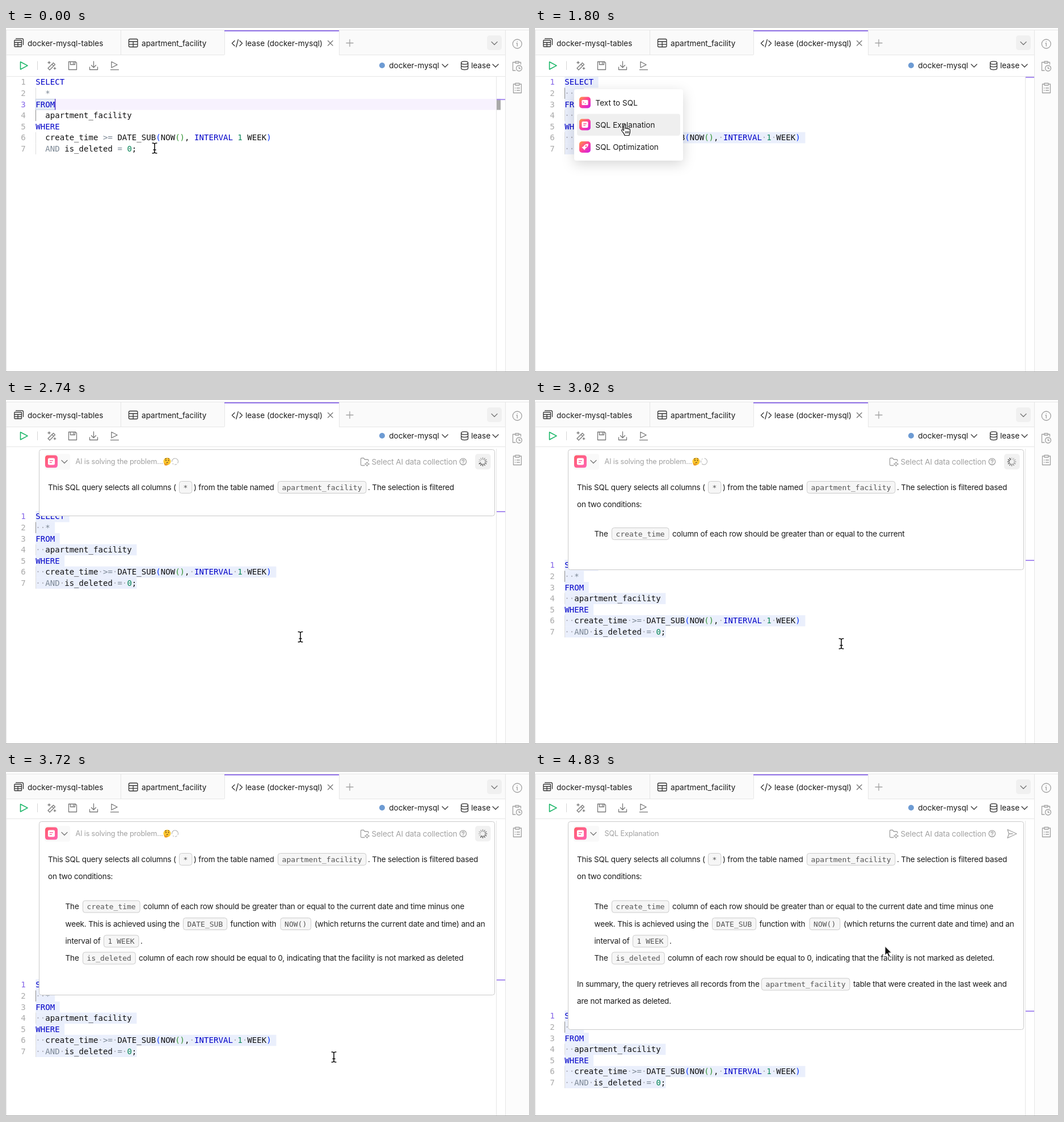
Animation of 922x607 px, one loop 4860 ms. Source, as an HTML page:

```html
<!DOCTYPE html>
<html lang="en">
<head>
<meta charset="utf-8">
<title>SQL editor</title>
<style>
  html, body { margin: 0; width: 100%; height: 100%; overflow: hidden; background: #fff; }
  svg { display: block; width: 922px; height: 607px; cursor: default; user-select: none; }
  text { font: 13.6px Inter, sans-serif; fill: #1c1c1c; white-space: pre; }
  .body { letter-spacing: -.21px; }
  .hint { font-size: 12.8px; letter-spacing: -.2px; fill: #a2a2a2; }
  .pale { letter-spacing: -.16px; fill: #a2a2a2; }
  .code { font: 14.09px "DejaVu Sans Mono", monospace; fill: #111; }
  .chip text { font: 13px "DejaVu Sans Mono", monospace; fill: #555; }
  .chip rect { fill: #f6f6f6; stroke: #cbcbcb; }
  .num { fill: #a9a9a9; }
  .num.on { fill: #8465e8; }
  .kw { fill: #0000c8; }
  .op { fill: #7b8794; }
  .lit { fill: #098658; }
  .p1 { fill: #0431fa; }
  .p2 { fill: #319331; }
  .dots { fill: #a9a9b4; }
  .i { fill: none; stroke: #333; stroke-width: 1.3; stroke-linecap: round; stroke-linejoin: round; }
  .g { stroke: #777; }
  .l { stroke: #a0a0a0; }
  .run { stroke: #18b566; stroke-width: 1.6; }
  .w { fill: #fff; }
  .line { fill: none; stroke: #e6e6e6; }
  #menu > rect:first-child { filter: drop-shadow(0 6px 11px rgba(0,0,0,.16)); }
</style>
</head>
<body>
<svg viewBox="0 0 922 607">
  <defs>
    <linearGradient id="hot" x1="0" y1="0" x2="1" y2="1">
      <stop offset="0" stop-color="#ff9a3d"/><stop offset=".5" stop-color="#ff3f9a"/><stop offset="1" stop-color="#c91fe8"/>
    </linearGradient>
    <linearGradient id="pink" x1="0" y1="0" x2="1" y2="1">
      <stop offset="0" stop-color="#ff5b68"/><stop offset="1" stop-color="#ff64b4"/>
    </linearGradient>
    <path id="down" d="M-5-2.5 0 2.5 5-2.5"/>
    <g id="note"><rect class="w" x="-5.5" y="-5.5" width="11" height="11" rx="2.2"/><path d="M-2.8-1.5H2.8M-2.8 1.7H1" stroke="#ff4f90" stroke-width="1.3"/></g>
    <path id="ibeam" d="M-3.8-9Q0-9 0-7 0-9 3.8-9M0-7V7M-3.8 9Q0 9 0 7 0 9 3.8 9M-2 3H2"/>
  </defs>
  <rect width="922" height="607" fill="#fff"/>

  <!-- editor -->
  <path class="line" d="M864.5 86V606"/>
  <g id="code"></g>

  <!-- tabs -->
  <rect y="4" width="880" height="43" fill="#fafafa"/>
  <rect x="881" y="4" width="41" height="602" fill="#fcfcfc"/>
  <rect x="385" y="4" width="202" height="44" fill="#fff"/>
  <path class="line" d="M0 3.5H922M.5 4V606M202.5 4V47M385.5 4V47M587.5 4V47M0 47.5H385M587 47.5H880M880.5 4V606"/>
  <path d="M385 5H587" stroke="#9273ea" stroke-width="2"/>
  <path d="M0 606.5H922" stroke="#a5a5a5"/>
  <path class="i" d="M17.5 18.7H28q2.500 0 2.500 2.500V29.500M15.800 21.500H26.500q1 0 1 1V32q0 1-1 1H15.800q-1 0-1-1V22.500q0-1 1-1ZM14.800 25.500H27.500M14.800 29.300H27.500M21 25.500V33"/>
  <text x="38" y="31.600">docker-mysql-tables</text>
  <path class="i" d="M218.500 19.500H230q2 0 2 2V31.500q0 2-2 2H218.500q-2 0-2-2V21.500q0-2 2-2ZM216.500 24H232M216.500 28.800H232M224.200 24V33.500"/>
  <text x="239" y="31.600">apartment_facility</text>
  <path class="i" d="M403 22.500 398.500 27 403 31.500M412 22.500 416.500 27 412 31.500M409.300 20.500 405.800 33.500"/>
  <text x="422" y="31.600">lease (docker-mysql)</text>
  <path class="i g" d="M567.500 22.500 576 31M576 22.500 567.500 31"/>
  <path class="i l" d="M600 26.500H612M606 20.500V32.500"/>
  <rect x="848" y="13" width="26" height="26" rx="5" fill="#f0f0f0"/>
  <use href="#down" class="i g" x="861" y="27"/>

  <!-- side bar -->
  <g class="i l">
    <circle cx="901.300" cy="28" r="8"/><path d="M901.300 27V32M900 27H901.300M901.300 24V24.200"/>
    <path d="M898 60.500H893.500V75H898M904 60.500H907.500V64M898 59H904V62H898Z"/><circle cx="904.500" cy="71" r="5"/><path d="M904.500 68.500V71.500H906.500"/>
    <path d="M898 99H894.500V114.500H908.500V99H905M898 97.500H905V101H898ZM897.500 106H898M900.500 106H905.500M897.500 110H898M900.500 110H905.500"/>
  </g>

  <!-- toolbar -->
  <g id="bar">
    <path class="line" d="M1 85.500H880"/>
    <path class="i run" d="M25.500 59.800V73L38 66.400Z"/>
    <path d="M55.500 58.500V74" stroke="#d5d5d5"/>
    <g class="i g">
      <path d="M74 71 83.500 61.500 86.500 64.500 77 74ZM81 64 84 67M76 59V63M74 61H78M86 69.500V73M84.300 71.300H87.800"/>
      <path d="M110.500 59.500H122.500L124.500 61.500V73.500H110.500ZM113.500 59.500V64.500H121.500V59.500M118.800 61V63"/>
      <path d="M154.500 59V69.500M150.500 65.800 154.500 69.800 158.500 65.800M147.500 69V73.500H161.500V69"/>
      <path d="M186 59.500V70L196 64.800ZM184.500 73.700H198.500"/>
    </g>
    <circle cx="663" cy="66" r="5" fill="#6d9bd3"/>
    <text x="675.300" y="71.300">docker-mysql</text>
    <use href="#down" class="i" x="774" y="66.500"/>
    <g class="i"><ellipse cx="808.500" cy="61.500" rx="6" ry="2.600"/><path d="M802.500 61.500V71c0 3.500 12 3.500 12 0V61.500M802.500 66c0 3.500 12 3.500 12 0"/></g>
    <text x="820" y="71.300">lease</text>
    <use href="#down" class="i" x="863" y="66.500"/>
  </g>

  <!-- answer panel -->
  <g id="panel">
    <rect id="box" x="58.500" y="87.500" width="803" rx="4" fill="#fff" stroke="#c9c9c9"/>
    <rect x="68" y="95" width="45" height="28" rx="4" fill="#f9f9f9"/>
    <rect x="69" y="97.500" width="22" height="22" rx="4.500" fill="url(#pink)"/>
    <use href="#note" transform="translate(80 108.500) scale(1.100)"/>
    <use href="#down" class="i g" x="103" y="109"/>
    <text id="title" class="hint" x="122.500" y="113.300"></text>
    <g class="i l"><path d="M632 115.500H627q-1.500 0-1.500-1.500V104q0-1.500 1.500-1.500H630.500L632.500 105H637.500q1.500 0 1.500 1.500V108M636.500 109.500 638 112 640.500 113 638 114 636.500 116.500 635 114 632.500 113 635 112Z"/><circle cx="805.800" cy="108.800" r="5.700"/><path d="M804 107.500c0-2.800 3.700-2.500 3.700-.3 0 1.500-1.900 1.300-1.900 3M805.800 112V112.200"/></g>
    <text class="pale" x="644.500" y="113.700">Select AI data collection</text>
    <g id="busy">
      <circle cx="284" cy="108.300" r="6.500" fill="#fcc72f"/>
      <circle cx="282" cy="106.500" r="1" fill="#664018"/><circle cx="286.500" cy="106.500" r="1" fill="#664018"/>
      <path d="M280 104 283 103.300M285.500 103 288 103.800M282.500 110.800 286 110" stroke="#664018" fill="none"/>
      <path d="M278 111 282 112.500H286L284 115.500H280Z" fill="#ec9a1c"/>
      <circle id="ring" cx="298" cy="108.500" r="5.500" fill="none" stroke="#b0b0b0" stroke-dasharray="12 2 4 2 2 3"/>
      <rect x="827" y="95" width="27.500" height="27.500" rx="5" fill="#f1f1f1"/>
      <g id="spin"></g>
    </g>
    <path id="send" class="i l" d="M833 101.500 849 109 833 116.500 835.500 109ZM835.500 109H842"/>
    <g id="answer"></g>
  </g>

  <!-- context menu -->
  <g id="menu">
    <rect x="69" y="108" width="192" height="126" rx="4" fill="#fff"/>
    <rect id="hover" x="74" width="182" height="38.500" rx="4" fill="#efefef"/>
    <g fill="url(#hot)"><rect x="78" y="121.500" width="20" height="20" rx="5"/><rect x="78" y="160.500" width="20" height="20" rx="5"/><rect x="78" y="200" width="20" height="20" rx="5"/></g>
    <rect class="w" x="82.500" y="127" width="11" height="9" rx="1.500"/><path d="M84.500 129.500 86.500 131 84.500 132.500M87.500 133.500H90" fill="none" stroke="#ff4f90"/>
    <use href="#note" x="88" y="170.500"/>
    <path class="w" d="M94 204.500Q88 204 85.500 209L82.500 210.500 87.500 215.500 89 212.500Q94 210 94 204.500Z"/><circle cx="90" cy="208.500" r="1.400" fill="#ff4f90"/>
    <text x="106.500" y="136.700">Text to SQL</text>
    <text x="106.500" y="175.700">SQL Explanation</text>
    <text x="106.500" y="214.900">SQL Optimization</text>
  </g>

  <!-- pointers -->
  <g id="beam" fill="none" stroke-linecap="round">
    <use href="#ibeam" stroke="#fff" stroke-width="3.200" opacity=".8"/>
    <use href="#ibeam" stroke="#111" stroke-width="1.600"/>
  </g>
  <path id="hand" d="M-4.500 1V-8c0-2 2.800-2 2.800 0V-2.500c.5-1.500 2.800-1.200 2.900.4.600-1.300 2.700-1 2.800.6.700-1 2.500-.6 2.500 1V4c0 2-1.500 3-1.500 5.500H-3C-3 7-6 4.500-8 1.500-9-.5-6.500-1.500-4.500 1ZM-1 2V6M1.500 2V6M4 2V6" fill="#fff" stroke="#111" stroke-width="1.200" stroke-linejoin="round"/>
  <path id="arrow" d="M0 0V16L3.700 12.500 6.500 19 9.200 17.800 6.400 11.500H11.500Z" fill="#111" stroke="#fff"/>
</svg>
<script>
const LOOP = 4860, X0 = 52.3, TOP = 85.8, ROW = 19.58, CW = 8.483;
const CLICK = 240, MENU = 1000, OPEN = 1980, DONE = 4070;

const $ = id => document.getElementById(id);
const set = (node, attrs) => { for (const k in attrs) node.setAttribute(k, attrs[k]); return node; };
const add = (parent, tag, attrs = {}, text = '') => {
  const node = set(document.createElementNS('http://www.w3.org/2000/svg', tag), attrs);
  node.textContent = text;
  return parent.appendChild(node);
};
const show = (node, on) => { node.style.display = on ? '' : 'none'; };
const clamp = (v, lo, hi) => Math.max(lo, Math.min(hi, v));

// value between timed points [t, a, b...]
function track(keys, t, ease = k => k) {
  if (t <= keys[0][0]) return keys[0].slice(1);
  for (let i = 1; i < keys.length; i++) {
    const a = keys[i - 1], b = keys[i];
    if (t <= b[0]) {
      const k = ease((t - a[0]) / (b[0] - a[0]));
      return a.slice(1).map((v, j) => v + (b[j + 1] - v) * k);
    }
  }
  return keys[keys.length - 1].slice(1);
}

// ---- code ----
const sql = ['SELECT', '  *', 'FROM', '  apartment_facility', 'WHERE',
  '  create_time >= DATE_SUB(NOW(), INTERVAL 1 WEEK)', '  AND is_deleted = 0;'];
const LAST = sql.length - 1;
const rowTop = i => TOP + i * ROW;
const code = $('code');
const active = add(code, 'rect', { x: X0, width: 812, height: ROW, fill: '#f7f2fe' });
const word = add(code, 'rect', { x: X0, y: rowTop(2) + .5, width: 4 * CW, height: ROW - 1, fill: '#e6edf7', stroke: '#c3cfe2' });
const block = add(code, 'rect', { x: 865, y: rowTop(2), width: 7, height: ROW, fill: '#a9a9a9' });
const mark = add(code, 'rect', { x: 865, width: 15, height: 2, fill: '#a78bf0' });

function paintTokens(parent, line) {
  let depth = 0;
  for (const tok of line.match(/\w+|[()]|[^\w()]+/g)) {
    let cls = '';
    if (/^(SELECT|FROM|WHERE|INTERVAL)$/.test(tok)) cls = 'kw';
    else if (/^(AND|\W*[*>=]+ ?)$/.test(tok)) cls = 'op';
    else if (/^\d+$/.test(tok)) cls = 'lit';
    else if (tok === '(') cls = 'p' + ++depth;
    else if (tok === ')') cls = 'p' + depth--;
    add(parent, 'tspan', { class: cls }, tok);
  }
}

const rows = sql.map((line, i) => {
  const y = rowTop(i), base = y + 14.6;
  const sel = add(code, 'rect', { y, height: ROW + .1 });
  const guide = /^ /.test(line) && add(code, 'path', { d: `M52.5 ${y}v${ROW}` });
  const dots = add(code, 'text', { class: 'code dots', x: X0, y: base });
  const num = add(code, 'text', { class: 'code num', x: 26.3, y: base }, i + 1);
  paintTokens(add(code, 'text', { class: 'code', x: X0, y: base }), line);
  return { line, sel, guide, dots, num };
});
const caret = add(code, 'rect', { width: 1.6, height: ROW, fill: '#6a4fd0' });

function paintCode(t, x, y, shift) {
  let row = 2, col = 4;
  if (t >= CLICK) {
    const at = t < 700 ? Math.floor((y - TOP) / ROW) : -1;
    row = clamp(at, 0, LAST);
    col = at < 0 ? 0 : clamp(Math.round((x - X0) / CW), 0, sql[row].length);
  }
  const picked = t >= CLICK && !(row === LAST && col === sql[LAST].length);
  const tint = t < MENU ? '#e0d2fc' : '#eaeffc';
  set(code, { transform: `translate(0 ${shift})` });
  show(active, !picked);
  set(active, { y: rowTop(row) });
  set(mark, { y: rowTop(row) + .2 });
  show(word, t < CLICK);
  show(block, t < CLICK);
  show(caret, t < MENU);
  set(caret, { x: X0 + col * CW - .3, y: rowTop(row) });
  rows.forEach((r, i) => {
    const on = picked && i >= row, from = i === row ? col : 0;
    show(r.sel, on);
    set(r.sel, { x: X0 + from * CW, width: (r.line.length - from + (i < LAST)) * CW, fill: tint });
    r.dots.textContent = on ? r.line.replace(/./g, (c, j) => c === ' ' && j >= from ? '·' : ' ') : '';
    r.num.classList.toggle('on', i === row);
    if (r.guide) set(r.guide, { stroke: i === (t < CLICK ? 3 : 1) ? '#8c8c8c' : '#dcdcdc' });
  });
}

// ---- answer: [y, [x, text]...]; a chip starts with ` ----
const reply = [
  [154, [74, 'This SQL query selects all columns ('], [305, '`*'], [331, ') from the table named'],
    [479, '`apartment_facility'], [638, '. The selection is filtered based']],
  [184, [74, 'on two conditions:']],
  [237.5, [104.5, 'The'], [135, '`create_time'],
    [242, 'column of each row should be greater than or equal to the current date and time minus one']],
  [268, [104.5, 'week. This is achieved using the'], [312, '`DATE_SUB'], [395.5, 'function with'],
    [483.5, '`NOW()'], [544, '(which returns the current date and time) and an']],
  [298.5, [104.5, 'interval of'], [172, '`1 WEEK'], [237, '.']],
  [328.5, [104.5, 'The'], [135, '`is_deleted'],
    [234, 'column of each row should be equal to 0, indicating that the facility is not marked as deleted.']],
  [374.5, [74, 'In summary, the query retrieves all records from the'], [399, '`apartment_facility'],
    [561, 'table that were created in the last week and']],
  [404.5, [74, 'are not marked as deleted.']]
];
// a list of one item is set tighter
const tightY = { 2: 236, 3: 263, 4: 290 };
let total = 0;
const lines = reply.map(([y, ...parts]) => {
  const g = add($('answer'), 'g'), start = total;
  const runs = parts.map(([x, raw]) => {
    const chip = raw[0] === '`', text = chip ? raw.slice(1) : raw, at = total;
    total += text.length;
    if (!chip) return { text, at, node: add(g, 'text', { class: 'body', x, y: 4.6 }) };
    const node = add(g, 'g', { class: 'chip' });
    add(node, 'rect', { x: x + .5, y: -10.5, width: text.length * 7.826 + 14.5, height: 21, rx: 4 });
    add(node, 'text', { x: x + 7.6, y: 4.6 }, text);
    return { text, at, node, chip };
  });
  return { y, g, start, runs };
});
const typed = [[2450, 0], [2738, 104], [3358, 330], [3716, 462], [3742, 462], [4060, total]];

function cut(text, n) {
  let out = '';
  for (const tok of text.match(/\s*(\w+|[^\w\s])/g)) {
    if (out.length + tok.length > n) break;
    out += tok;
  }
  return out;
}

// fills the panel and returns its bottom edge
function paintAnswer(t) {
  const n = Math.floor(track(typed, t)[0] + .01);
  const loose = n > lines[5].start;
  let bottom = 131;
  lines.forEach((l, i) => {
    const on = n > l.start, y = loose ? l.y : tightY[i] || l.y;
    show(l.g, on);
    if (!on) return;
    set(l.g, { transform: `translate(0 ${y})` });
    for (const r of l.runs) {
      if (r.chip) show(r.node, n >= r.at + r.text.length);
      else r.node.textContent = cut(r.text, n - r.at);
    }
    bottom = y + (i < 2 || i > 5 ? 50 : loose ? 64.5 : 63);
  });
  return Math.floor(bottom);
}

for (let i = 0; i < 12; i++)
  add($('spin'), 'path', { d: 'M0-3.8V-7.8', stroke: '#333', 'stroke-width': 1.4, opacity: .2 + i / 14, transform: `rotate(${i * 30})` });

// ---- pointer ----
const path = [[240, 262, 212], [700, 56, 74], [820, 56, 72], [895, 69, 108], [1100, 69, 108],
  [1760, 161, 180], [1960, 161, 180], [2460, 470, 331], [2735, 519, 418], [3000, 540, 430],
  [3400, 540, 430], [3720, 578, 503], [3740, 578, 503], [4080, 469, 518], [4260, 603, 349],
  [4750, 603, 349], [4830, 617, 307.5]];
const smooth = k => k * k * (3 - 2 * k);

function paint(t) {
  const [x, y] = track(path, t, smooth);
  const open = t >= OPEN, menu = t >= MENU && !open, busy = t < DONE;
  let shift = 0;
  if (open) {
    const h = paintAnswer(t) - 87;
    shift = Math.round(h * .9 + 5);
    set($('box'), { height: h });
    $('title').textContent = busy ? 'AI is solving the problem...' : 'SQL Explanation';
    set($('spin'), { transform: `translate(840.5 109) rotate(${Math.floor(t / 83) * 30})` });
    set($('ring'), { transform: `rotate(${t * .36} 298 108.5)` });
  }
  paintCode(t, x, y, shift);
  show($('panel'), open);
  show($('busy'), busy);
  show($('send'), !busy);
  set($('bar'), { transform: `translate(0 ${open ? -3 : 0})` });
  show($('menu'), menu);
  show($('hover'), y > 112);
  set($('hover'), { y: y < 151 ? 112.5 : 151.5 });
  const kind = menu && y > 112 ? 'hand' : t > DONE && y < 454 ? 'arrow' : 'beam';
  for (const id of ['beam', 'hand', 'arrow']) {
    show($(id), id === kind);
    set($(id), { transform: `translate(${x} ${y})` });
  }
}

const begin = performance.now();
function tick() {
  paint((performance.now() - begin) % LOOP);
  requestAnimationFrame(tick);
}
tick();
</script>
</body>
</html>
```
